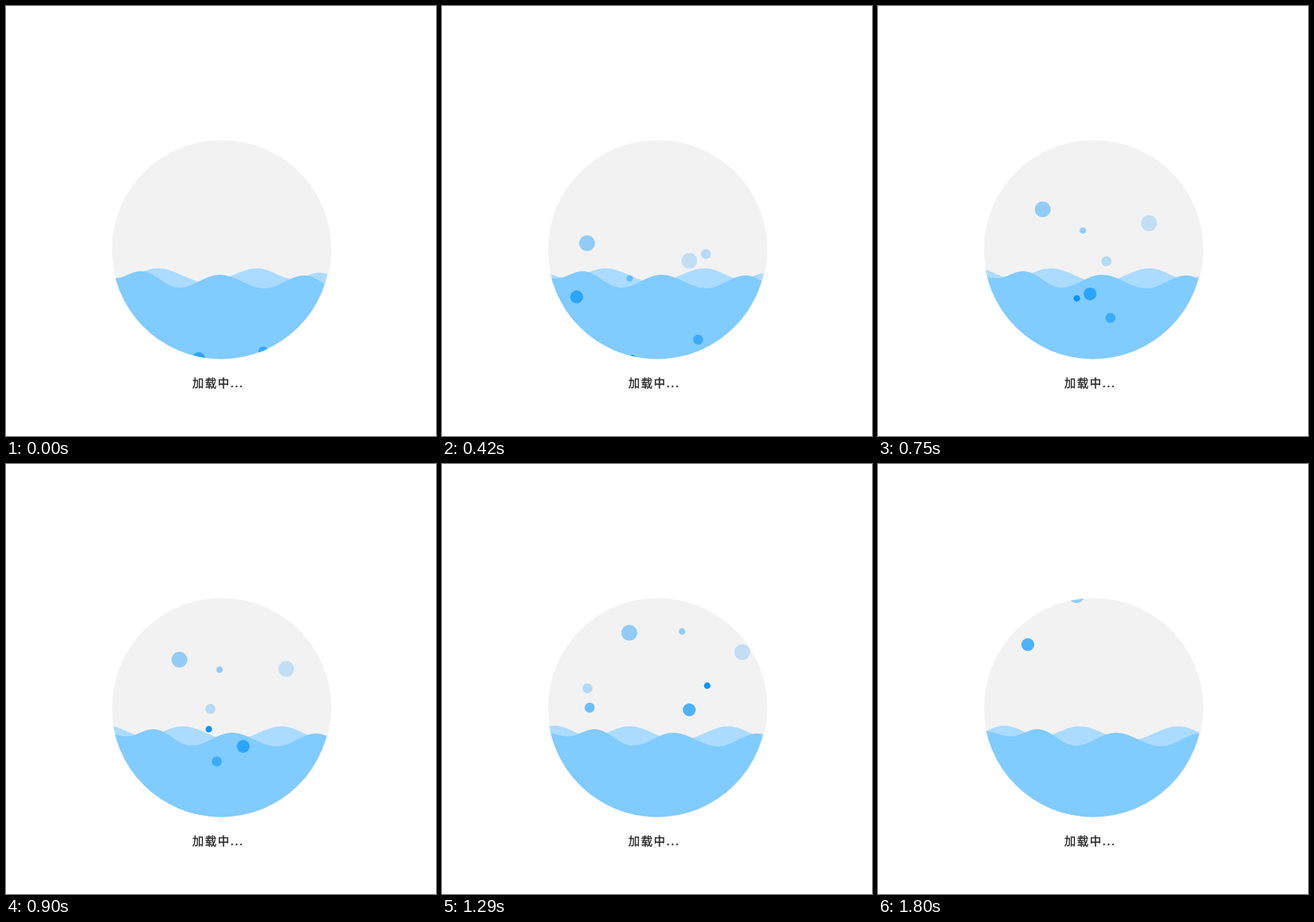
Recreate the animation shown at these times as an HTML page. Size 600 by 600 pixels, loop 1.83 s.

```html
<!DOCTYPE html>
<html lang="zh-CN">
<head>
<meta charset="utf-8">
<style>
  html, body { margin: 0; width: 100%; height: 100%; overflow: hidden; background: #fff; }
  svg { display: block; width: 100vw; height: 100vh; }
  text {
    font: 500 16px "Noto Sans CJK SC", "Noto Sans CJK", "Noto Sans", sans-serif;
    letter-spacing: 1.75px; fill: #2b2b2b; stroke: #2b2b2b; stroke-width: .4px;
  }
  #back, #front { animation: drift 1830ms steps(61) infinite; }
  #back { --shift: 70px; }
  #front { --shift: 34.6px; }
  @keyframes drift { to { transform: translateX(var(--shift)); } }
</style>
</head>
<body>
<svg viewBox="0 0 600 600">
  <defs>
    <clipPath id="bowl"><circle cx="301" cy="340" r="153"/></clipPath>
    <clipPath id="inner"><circle cx="300" cy="340" r="152.5"/></clipPath>
  </defs>
  <circle cx="301" cy="340" r="153" fill="#f2f2f2"/>
  <g clip-path="url(#inner)">
    <path id="back" fill="#abdbff"/>
    <path id="front" fill="#80cbff"/>
  </g>
  <g id="bubbles" clip-path="url(#bowl)" fill="#0093ff"></g>
  <text x="260" y="532">加载中...</text>
</svg>
<script>
const LOOP = 1830, STEP = 30;

// Crests and troughs in turn
const waves = {
  back: [[56, 382], [107, 365], [159, 380], [212, 366], [281, 386], [351, 366], [402, 381], [437, 372], [475, 382]],
  front: [[110, 372], [152, 380], [188, 370], [242, 393], [298, 375], [361, 394], [416, 376], [464, 394]]
};

// Radius, opacity, then the turning points as time, x, y
const bubbles = [
  [11, .4, [0, 169, 437], [600, 217, 298], [900, 242, 273], [1800, 277, 183]],
  [4.5, .4, [0, 240, 486], [270, 253, 415], [900, 298, 287], [1800, 388, 178]],
  [11, .2, [0, 270, 504], [270, 323, 397], [900, 391, 286], [1800, 448, 256]],
  [9, .68, [0, 269, 492], [270, 183, 424], [900, 331, 394], [1290, 345, 343], [1500, 272, 313], [1800, 209, 252]],
  [7, .25, [30, 470, 335], [270, 393, 335], [600, 347, 360], [1290, 203, 313], [1800, 140, 365]],
  [7, .55, [0, 359, 482], [600, 346, 452], [1290, 206, 340], [1800, 105, 185]],
  [4.5, .97, [390, 264, 499], [900, 283, 370], [1800, 484, 230]]
].map(([r, alpha, ...path]) => ({ r, alpha, path }));

// Sine-like curve through crests and troughs
function wavePath(points) {
  let d = `M${points[0]}`;
  for (let i = 1; i < points.length; i++) {
    const [x0, y0] = points[i - 1], [x1, y1] = points[i], h = (x1 - x0) * .3642;
    d += `C${x0 + h} ${y0} ${x1 - h} ${y1} ${x1} ${y1}`;
  }
  return `${d}V500H${points[0][0]}Z`;
}

// Slope at a turning point, weighted by the lengths of its two spans
function slope(path, i, axis) {
  const rate = k => (path[k + 1][axis] - path[k][axis]) / (path[k + 1][0] - path[k][0]);
  if (i === 0) return rate(0);
  if (i === path.length - 1) return rate(i - 1);
  const before = path[i][0] - path[i - 1][0], after = path[i + 1][0] - path[i][0];
  return (rate(i - 1) * after + rate(i) * before) / (before + after);
}

// Smooth curve through the turning points; short paths keep their corner
function position(path, t, axis) {
  let i = 0;
  while (i < path.length - 2 && t >= path[i + 1][0]) i++;
  const a = path[i], b = path[i + 1], span = b[0] - a[0];
  const u = Math.min(1, Math.max(0, (t - a[0]) / span)), v = 1 - u;
  if (path.length < 4) return v * a[axis] + u * b[axis];
  return v * v * (1 + 2 * u) * a[axis] + u * u * (3 - 2 * u) * b[axis]
    + span * u * v * (v * slope(path, i, axis) - u * slope(path, i + 1, axis));
}

for (const id in waves) document.getElementById(id).setAttribute('d', wavePath(waves[id]));

const group = document.getElementById('bubbles');
for (const b of bubbles) {
  b.el = document.createElementNS('http://www.w3.org/2000/svg', 'circle');
  b.el.setAttribute('r', b.r);
  b.el.setAttribute('fill-opacity', b.alpha);
  group.append(b.el);
}

const start = performance.now();
function tick() {
  const t = Math.floor((performance.now() - start) % LOOP / STEP) * STEP;
  for (const { el, path } of bubbles) {
    el.setAttribute('cx', position(path, t, 1));
    el.setAttribute('cy', position(path, t, 2));
  }
  requestAnimationFrame(tick);
}
tick();
</script>
</body>
</html>
```
